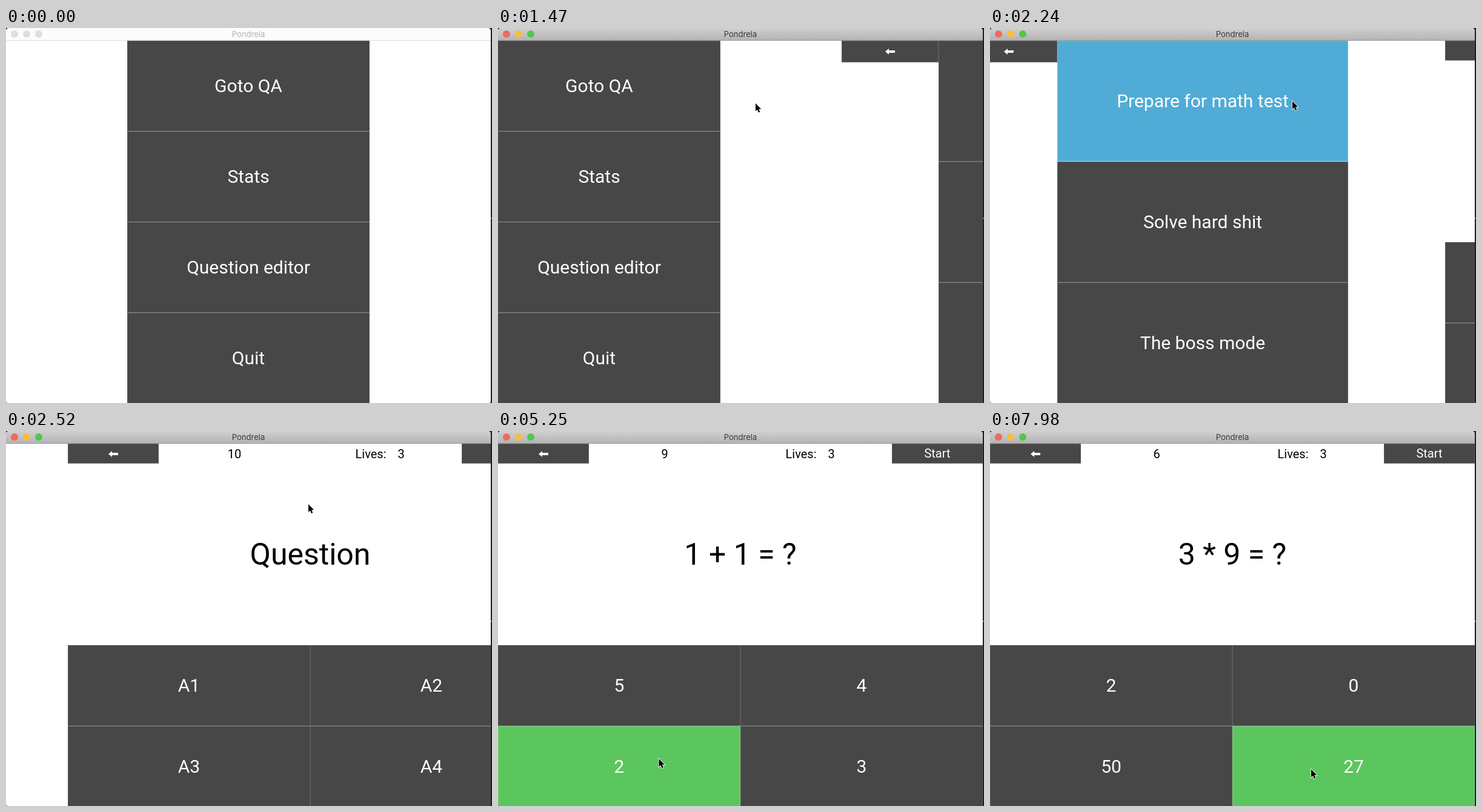
An HTML page with a canvas that plays this animation: 802 by 620 pixels, repeating every 8000 ms.

```html
<!DOCTYPE html>
<html lang="en">
<head>
<meta charset="utf-8">
<title>Pondrela</title>
<style>
  html, body { margin: 0; width: 100%; height: 100%; overflow: hidden; background: #16222f; }
  canvas { display: block; }
</style>
</head>
<body>
<canvas id="stage" width="802" height="620"></canvas>
<script>
const ctx = document.getElementById('stage').getContext('2d');
const LOOP = 8000, STEP = 70, WIDTH = 800, HEIGHT = 620, TOP = 21;
const PRESS_TIME = 140, SLIDE_TIME = 457.8, SECOND = 1050;

const NORMAL = { fill: '#474747', bottom: '#858585', side: '#5c5c5c' };
const PRESSED = { fill: '#50acd6', bottom: '#a9d7ec', side: '#74bddf' };
const CORRECT = { fill: '#5cc65e', bottom: '#9bdc9c', side: '#7cd27e' };

const ARROW = new Path2D('M-8 0l6-5v3h10v4h-10v3z');
const CURSOR = new Path2D('M0 0v13l3-2.6 2 4.9 2.3-1-2-4.7h4z');

const ENTRY = { x: 449, y: 511 };
const MOVES = [
  { start: 280, end: 630, x: 424.5, y: 124 },
  { start: 1540, end: 2030, x: 498.5, y: 120.5 },
  { start: 2520, end: 3080, x: 677.5, y: 57 },
  { start: 4060, end: 4970, x: 265, y: 541.5 },
  { start: 7140, end: 7700, x: 529.5, y: 559 }
];

const QUIZ = [
  { start: 0, question: 'Question', answers: ['A1', 'A2', 'A3', 'A4'] },
  { start: 3500, question: '1 + 1 = ?', answers: ['5', '4', '2', '3'], correct: 2, clicked: 5250 },
  { start: 6160, question: '3 * 9 = ?', answers: ['2', '0', '50', '27'], correct: 3, clicked: 7980 }
];

const progress = (t, start, end) => Math.min(1, Math.max(0, (t - start) / (end - start)));
const smooth = p => p * p * (3 - 2 * p);
const easeOut = p => p * (2 - p);
const pressStyle = (t, start) => t >= start && t < start + PRESS_TIME ? PRESSED : NORMAL;

function rect(x, y, w, h, color) {
  ctx.fillStyle = color;
  ctx.fillRect(x, y, w, h);
}

function label(text, x, y, size, color = '#000') {
  ctx.font = `${size}px Roboto, sans-serif`;
  ctx.textAlign = 'center';
  ctx.fillStyle = color;
  ctx.fillText(text, x, Math.round(y + size * 0.342));
}

function at(x, y, paint) {
  ctx.save();
  ctx.translate(x, y);
  paint();
  ctx.restore();
}

function button(x, y, w, h, text, style = NORMAL, size = 30) {
  rect(x, y, w, h, style.side);
  rect(x + 1, y + 1, w - 2, h - 1, style.fill);
  rect(x, y + h - 1, w, 1, style.bottom);
  label(text, x + w / 2, y + h / 2, size, '#fff');
}

function backButton(w, h) {
  button(0, TOP, w, h, '');
  at(w / 2, TOP + Math.round(h / 2), () => {
    ctx.fillStyle = '#fff';
    ctx.fill(ARROW);
  });
}

// A column of equal buttons; the first one gets pressed.
function buttonList(x, w, h, texts, firstStyle) {
  texts.forEach((text, i) => button(x, TOP + i * h, w, h, text, i ? NORMAL : firstStyle));
}

function menuScreen(t) {
  buttonList(200, 400, 150, ['Goto QA', 'Stats', 'Question editor', 'Quit'], pressStyle(t, 1330));
}

function modeScreen(t) {
  backButton(160, 36);
  buttonList(160, 480, 200, ['Prepare for math test', 'Solve hard shit', 'The boss mode'], pressStyle(t, 2240));
}

function quizScreen(t) {
  const round = QUIZ.findLast(({ start }) => t >= start);
  const elapsed = Math.max(0, Math.floor((t - 3430) / SECOND));
  backButton(150, 33);
  label(10 - elapsed, 275, 38, 20);
  label('Lives:', 500, 38, 20);
  label('3', 550, 38, 20);
  button(650, TOP, 150, 33, 'Start', pressStyle(t, 3080), 20);
  label(round.question, 400, 204, 50);
  round.answers.forEach((text, i) => {
    const solved = i === round.correct && t >= round.clicked;
    button(i % 2 * 400, 354 + Math.floor(i / 2) * 134, 400, 134, text, solved ? CORRECT : NORMAL);
  });
}

function titleBar(active) {
  const shade = ctx.createLinearGradient(0, 0, 0, 20);
  shade.addColorStop(0, active ? '#d0d0d0' : '#fcfcfc');
  shade.addColorStop(1, active ? '#b4b4b4' : '#fcfcfc');
  rect(0, 0, WIDTH, 20, shade);
  rect(0, 20, WIDTH, 1, active ? '#969696' : '#dcdcdc');
  ['#f0695e', '#f6be40', '#52c749'].forEach((color, i) => {
    ctx.beginPath();
    ctx.arc(14 + i * 20, 10, 6, 0, Math.PI * 2);
    ctx.fillStyle = active ? color : '#dedede';
    ctx.fill();
  });
  ctx.font = '13px Inter, sans-serif';
  ctx.textAlign = 'center';
  ctx.fillStyle = active ? '#383838' : '#b2b2b2';
  ctx.fillText('Pondrela', 400, 15);
}

function pointer(t) {
  if (t < MOVES[0].start) return;
  let { x, y } = ENTRY;
  for (const move of MOVES) {
    const p = smooth(progress(t, move.start, move.end));
    x += (move.x - x) * p;
    y += (move.y - y) * p;
  }
  at(x + 0.5, y + 0.5, () => {
    ctx.lineWidth = 1.6;
    ctx.strokeStyle = '#fff';
    ctx.stroke(CURSOR);
    ctx.fillStyle = '#000';
    ctx.fill(CURSOR);
  });
}

function draw(t) {
  rect(0, 0, 802, HEIGHT, '#16222f');
  rect(WIDTH, 314, 2, 1, '#c8ccd0');
  ctx.save();
  ctx.beginPath();
  ctx.roundRect(0, 0, WIDTH, HEIGHT, [5, 5, 3, 3]);
  ctx.clip();
  rect(0, 0, WIDTH, HEIGHT, '#fff');
  const pages = [1397.6, 2225.8]
    .reduce((sum, start) => sum + easeOut(progress(t, start, start + SLIDE_TIME)), 0);
  [menuScreen, modeScreen, quizScreen].forEach((screen, i) =>
    at(Math.round((i - pages) * WIDTH), 0, () => screen(t)));
  titleBar(t >= 910);
  ctx.restore();
  pointer(t);
}

function frame() {
  const t = performance.now() % LOOP;
  draw(Math.floor(t / STEP) * STEP);
  requestAnimationFrame(frame);
}
frame();
</script>
</body>
</html>
```
